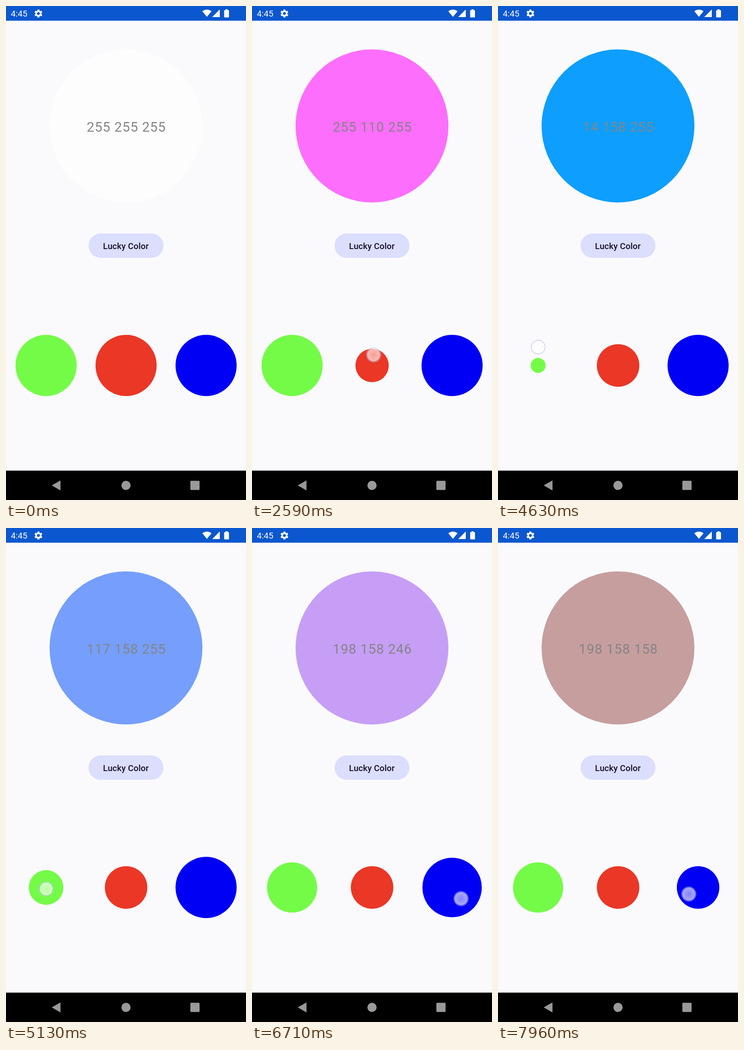
Animation, 522 px wide and 1073 px high, one loop 8 s. Source, as an HTML page:

```html
<!DOCTYPE html>
<html lang="en">
<head>
<meta charset="utf-8">
<title>Color mixer</title>
<style>
  html, body { margin: 0; width: 100%; height: 100%; overflow: hidden; background: #fafafd; }
  svg { display: block; width: 522px; height: 1073px; }
  text { font-family: Roboto, sans-serif; }
  .mid { text-anchor: middle; }
</style>
</head>
<body>
<svg viewBox="0 0 522 1073">
  <defs>
    <radialGradient id="glow">
      <stop offset="0" stop-color="#fff" stop-opacity=".52"/>
      <stop offset=".75" stop-color="#fff" stop-opacity=".66"/>
      <stop offset="1" stop-color="#fff" stop-opacity="0"/>
    </radialGradient>
  </defs>
  <rect width="522" height="1073" fill="#fafafd"/>

  <!-- status bar -->
  <rect width="522" height="31.9" fill="#0a57cf"/>
  <g fill="#fff">
    <text x="10.5" y="23" font-size="18.6">4:45</text>
    <g fill="none" stroke="#fff" transform="translate(70.5 16.3) rotate(30)">
      <circle r="4.9" stroke-width="3.6"/>
      <circle r="7.2" stroke-width="3" pathLength="60" stroke-dasharray="5.4 4.6" stroke-dashoffset="2.7"/>
    </g>
    <path d="M427 11.5Q437 4 447 11.5L437 23.5Z"/>
    <path d="M465 7.5V24H448.5Z"/>
    <rect x="474.500" y="9" width="10.500" height="15.700" rx="1.200"/>
    <rect x="477.500" y="7" width="4.500" height="3"/>
  </g>

  <!-- mixed colour -->
  <circle id="mix" cx="261" cy="260.500" r="166.200"/>
  <text id="label" class="mid" x="261.800" y="272.500" font-size="29.24" letter-spacing=".031em" fill="#858585"/>

  <rect x="179.500" y="494" width="163" height="53" rx="26.500" fill="#dcdefd"/>
  <text class="mid" x="260.800" y="527.500" font-size="18.6" font-weight="500" letter-spacing=".007em" fill="#12102c">Lucky Color</text>

  <!-- channel handles -->
  <g id="handles">
    <circle cx="87.200" cy="780.800" fill="#74fb48"/>
    <circle cx="261.200" cy="780.800" fill="#ea3726"/>
    <circle cx="435.200" cy="780.800" fill="#0000f5"/>
  </g>

  <g id="touch">
    <circle r="17.500" fill="url(#glow)"/>
    <circle r="15" fill="none" stroke="#5a69c8" stroke-opacity=".27" stroke-width="1.800"/>
  </g>

  <!-- navigation bar -->
  <rect y="1009.200" width="522" height="64"/>
  <g fill="#999">
    <path d="M99.500 1041.300L118.500 1030.500V1052.200Z"/>
    <circle cx="261" cy="1041.300" r="10"/>
    <rect x="401" y="1031.300" width="20" height="20" rx="1.800"/>
  </g>
</svg>
<script>
const LOOP = 8000, FADE_IN = 120, FADE_OUT = 240;
const DP = 522 / 392.73;
const [mix, label, touch, handleGroup] =
  ['mix', 'label', 'touch', 'handles'].map(id => document.getElementById(id));
const handles = [...handleGroup.children];

// Each finger stroke eases from its first point to its turn, then to its end: [x, y, channel value]
const strokes = [
  { channel: 1, begin: 1150, turn: 1300, end: 1430,
    points: [[326, 448, 255], [326, 448, 255], [326, 448, 255]] },
  { channel: 1, begin: 2250, turn: 2800, end: 3400,
    points: [[270, 805, 255], [262, 735, 40], [262, 800, 158]] },
  { channel: 0, begin: 4000, turn: 4630, end: 5560,
    points: [[113, 804, 255], [87.5, 741, 14], [87.5, 818, 198]] },
  { channel: 2, begin: 6600, turn: 7330, end: 7960,
    points: [[455, 810, 255], [449.6, 731, 103], [415, 795, 158]] }
];

const clamp = v => Math.max(0, Math.min(1, v));
const ease = p => p * p * (3 - 2 * p);

function strokeAt({ begin, turn, end, points: [first, middle, last] }, t) {
  const there = ease(clamp((t - begin) / (turn - begin)));
  const back = ease(clamp((t - turn) / (end - turn)));
  return first.map((v, i) => v + (middle[i] - v) * there + (last[i] - middle[i]) * back);
}

function draw(t) {
  const rgb = [255, 255, 255];
  let opacity = 0;
  for (const stroke of strokes) {
    const { channel, begin, end } = stroke;
    if (t < begin - FADE_IN) break;
    const [x, y, value] = strokeAt(stroke, t);
    rgb[channel] = Math.round(value);
    opacity = Math.min(clamp(1 + (t - begin) / FADE_IN), clamp(1 + (end - t) / FADE_OUT));
    touch.setAttribute('transform', `translate(${x} ${y})`);
  }
  touch.setAttribute('opacity', opacity);
  mix.setAttribute('fill', `rgb(${rgb.map(v => Math.min(v, 253))})`);
  label.textContent = rgb.join(' ');
  handles.forEach((handle, i) => handle.setAttribute('r', (10 + 40 * rgb[i] / 255) * DP));
}

const origin = performance.now();
function tick() {
  draw((performance.now() - origin) % LOOP);
  requestAnimationFrame(tick);
}
tick();
</script>
</body>
</html>
```
